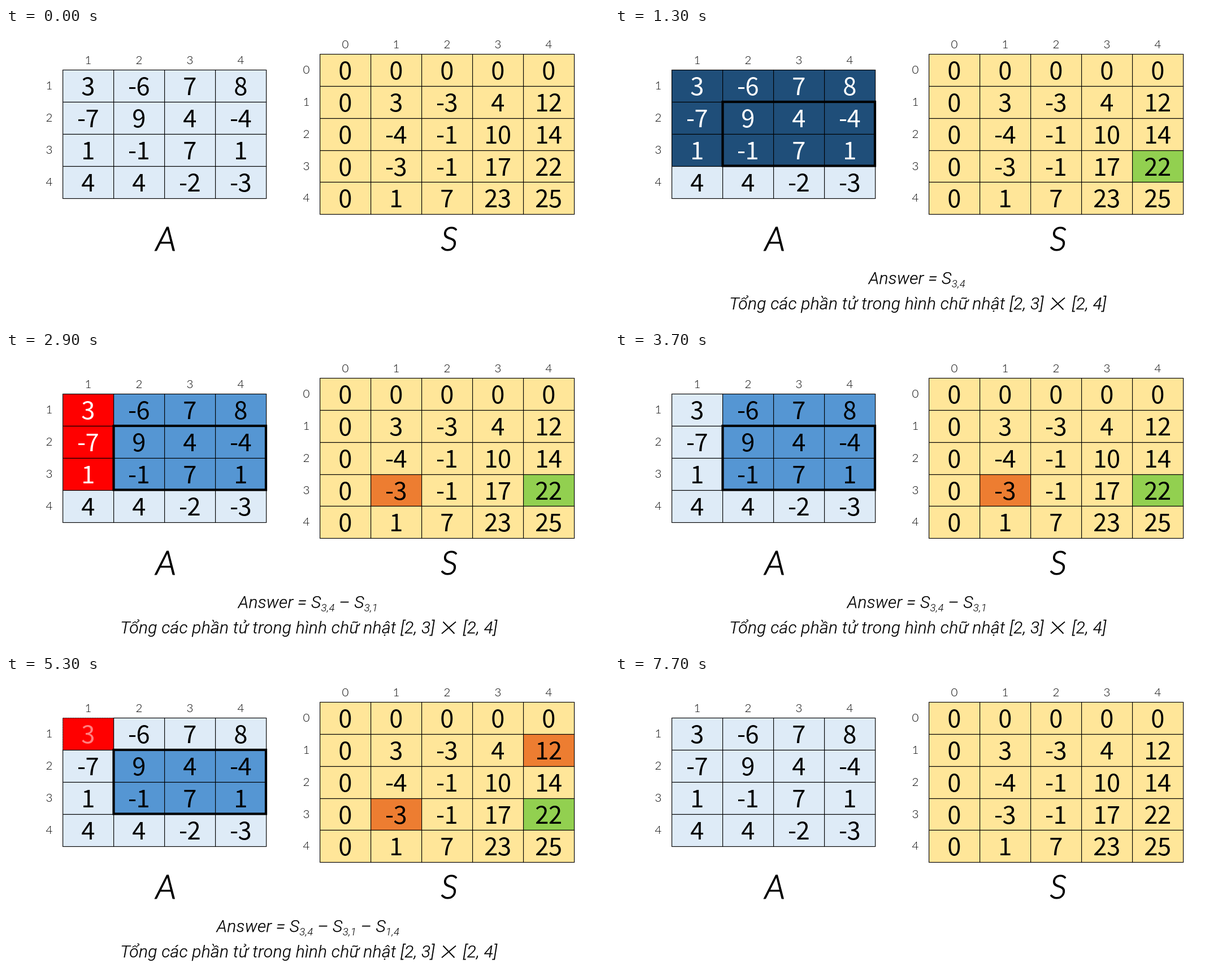
An HTML page for the animation above (8 s loop, 1067 px wide and 525 px high).

```html
<!DOCTYPE html>
<html lang="vi">
<head>
<meta charset="utf-8">
<title>Prefix sums on a grid</title>
<style>
  html, body { margin: 0; width: 100%; height: 100%; overflow: hidden; background: #fff; }
  svg { display: block; width: 100vw; height: 100vh; }
  text { font-family: Lato, "Open Sans", sans-serif; font-weight: 300; text-anchor: middle; }
  .num { font: 350 43.5px "Noto Sans CJK JP", "Noto Sans CJK SC", Lato, sans-serif; letter-spacing: -0.5px; }
  .idx { font-size: 20.5px; }
  .name { font-size: 60px; font-style: italic; stroke: #000; stroke-width: 1.1; }
  .note { font: italic 300 30px Roboto, "Open Sans", sans-serif; letter-spacing: 0.3px; stroke: #000; stroke-width: 0.25; }
  .sub { font-size: 18.5px; stroke: none; }
  .cell { stroke: #000; stroke-width: 1.15; }
</style>
</head>
<body>
<svg id="stage" viewBox="0 0 1067 525"></svg>
<script>
const NS = "http://www.w3.org/2000/svg";
const stage = document.getElementById("stage");
const LOOP = 8000, FIRST = 500, STEP = 800, COUNT = 10;
const W = 90, H = 56.8;

const TONES = {
  light: ["#deebf7", "#000"],
  mid: ["#5596d3", "#000"],
  dark: ["#1f4e79", "#fff"],
  red: ["#ff0000", "#fff"],
  faded: ["#ff0000", "#ff8080"],
  sand: ["#ffe699", "#000"],
  green: ["#92d050", "#000"],
  orange: ["#ed7d31", "#000"]
};

const A = [[3, -6, 7, 8], [-7, 9, 4, -4], [1, -1, 7, 1], [4, 4, -2, -3]];

// Each S cell is the sum of A above and to the left of it.
const S = Array.from({ length: 5 }, (_, r) => Array.from({ length: 5 }, (_, c) =>
  A.slice(0, r).reduce((sum, row) => sum + row.slice(0, c).reduce((a, b) => a + b, 0), 0)));

// Terms of the answer and the step at which each one joins.
const TERMS = [
  { r: 3, c: 4, from: 2, sign: "", tone: "green" },
  { r: 3, c: 1, from: 4, sign: "–", tone: "orange" },
  { r: 1, c: 4, from: 6, sign: "–", tone: "orange" },
  { r: 1, c: 1, from: 8, sign: "+", tone: "green" }
];

function add(tag, attrs, parent = stage, content) {
  const el = document.createElementNS(NS, tag);
  for (const k in attrs) el.setAttribute(k, attrs[k]);
  if (content !== undefined) el.textContent = content;
  parent.appendChild(el);
  return el;
}

const label = (x, y, cls, content, parent) => add("text", { x, y, class: cls }, parent, content);

function makeTable(data, left, top, base) {
  const line = r => Math.round(top + r * H) + 0.5;
  const cells = data.map((row, r) => row.map((_, c) => add("rect", {
    class: "cell", x: left + c * W + 0.6, y: line(r), width: W, height: line(r + 1) - line(r)
  })));
  const nums = data.map((row, r) => row.map((v, c) =>
    label(left + c * W + 45, top + r * H + 45, "num", v)));
  data[0].forEach((_, c) => label(left + c * W + 45.5, top - 10.5, "idx", c + base));
  data.forEach((_, r) => label(left - 23.5, top + r * H + 35, "idx", r + base));
  return (toneAt) => data.forEach((row, r) => row.forEach((_, c) => {
    const [fill, ink] = TONES[toneAt(r, c)];
    cells[r][c].setAttribute("fill", fill);
    nums[r][c].setAttribute("fill", ink);
  }));
}

const paintA = makeTable(A, 100, 74.4, 1);
const paintS = makeTable(S, 555, 46.2, 0);
const firstCell = stage.querySelector(".cell");

label(283, 395, "name", "A");
label(784.5, 395, "name", "S");

const query = add("g");
add("rect", { x: 190.5, y: 131, width: 269.5, height: 113.5, fill: "none", stroke: "#000", "stroke-width": 4.2 }, query);
label(480.5, 499, "note", "Tổng các phần tử trong hình chữ nhật [2, 3]", query);
label(839, 499, "note", "[2, 4]", query);
add("path", { d: "M771 499.5L796 478.5M773.5 478.5L793.5 499.5", stroke: "#000", "stroke-width": 1.9 }, query);
const answer = label(534.5, 454, "note", "", query);

function toneA(step, r, c) {
  if (step < 2 || r > 2) return "light";
  if (step === 2) return "dark";
  if (step === 4 && c === 0) return "red";
  if (step === 6 && r === 0) return "red";
  if (r === 0 && c === 0) {
    if (step === 7) return "faded";
    if (step === 8) return "dark";
  }
  const kept = (step < 4 || c > 0) && (step < 6 || r > 0);
  return kept ? "mid" : "light";
}

function writeAnswer(step) {
  answer.textContent = "";
  TERMS.filter(t => step >= t.from).forEach((t, i) => {
    add("tspan", { dy: i ? -6 : 0 }, answer, i ? ` ${t.sign} S` : "Answer = S");
    add("tspan", { dy: 6, class: "sub" }, answer, `${t.r},${t.c}`);
  });
}

let shown = -1;

function render(time) {
  const t = time % LOOP;
  const step = t < FIRST ? 0 : (1 + Math.floor((t - FIRST) / STEP)) % COUNT;
  if (step === shown) return;
  shown = step;
  query.setAttribute("visibility", step ? "visible" : "hidden");
  paintA((r, c) => toneA(step, r, c));
  paintS((r, c) => {
    const term = TERMS.find(k => step >= k.from && k.r === r && k.c === c);
    return term ? term.tone : "sand";
  });
  firstCell.setAttribute("stroke-dasharray", step === 7 ? "2 1" : "none");
  writeAnswer(step);
}

const start = performance.now();
function tick() {
  render(performance.now() - start);
  requestAnimationFrame(tick);
}
tick();
</script>
</body>
</html>
```
